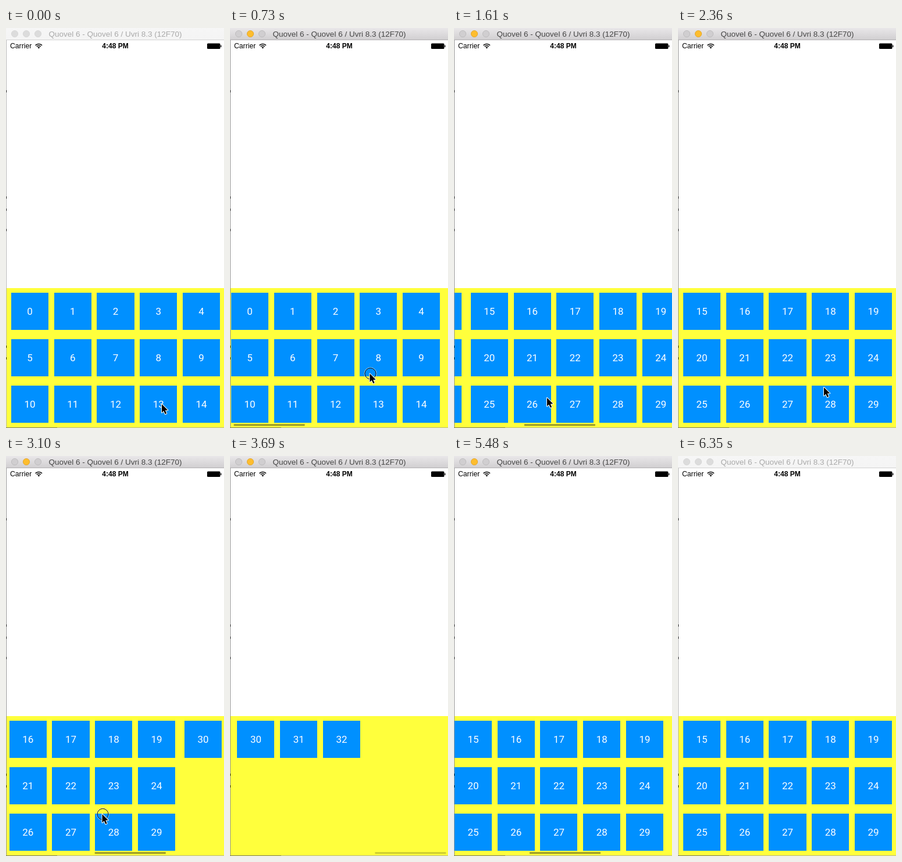
An HTML page with a canvas that plays this animation: 375x689 px, repeating every 6450 ms.

```html
<!DOCTYPE html>
<html lang="en">
<head>
<meta charset="utf-8">
<title>Paged grid</title>
<style>
html, body { margin: 0; width: 100%; height: 100%; overflow: hidden; background: #fff; }
canvas { display: block; }
</style>
</head>
<body>
<canvas id="stage" width="375" height="689"></canvas>
<script>
const W = 375, H = 689, LOOP = 6450;
const TICK = 147.7, LEAD = 15;   // the screen refreshes once per tick
const PAGE = 375, CELL = 64, PITCH = 73.75, ROW = 80, TOP = 448;
const CLICK = 4, BLUR = 43;      // ticks when the window gains and loses focus
const ctx = document.getElementById('stage').getContext('2d');
const SANS = '"Liberation Sans", Arial, sans-serif';

// Times in ticks: touch, lift, rest. Pages and dragged distance in px.
const SWIPES = [
  { touch: 4, lift: 7, rest: 16, from: 0, to: 1, drag: 62.5, tau: 1.45 },
  { touch: 19, lift: 21, rest: 26, from: 1, to: 2, drag: 77, tau: 0.9 },
  { touch: 32, lift: 33, rest: 39, from: 2, to: 1, drag: -36, tau: 1.07 }
];

// Pointer tip: tick, x, y
const PATHS = [
  [[0, 268, 648], [2, 264, 593], [4, 264, 594], [7, 193.5, 598], [11, 160, 637],
   [16, 251, 619], [19, 251, 619], [21, 165.5, 617], [23, 4, 677]],
  [[31, 129, 595], [32, 129, 595], [33, 186.5, 598], [35, 352, 612]]
];
const ARROW = new Path2D('M0 0V14.5L3.3 11.5 5.8 17 8.2 16 5.8 10.6 10.3 10.3Z');

const lerp = (a, b, u) => a + (b - a) * u;

// The drag speeds up with the finger, then the page glides to rest.
function scrollAt(k) {
  const s = SWIPES.findLast(s => s.touch <= k);
  if (!s) return 0;
  const from = s.from * PAGE, to = s.to * PAGE;
  if (k >= s.rest) return to;
  if (k <= s.lift) return from + s.drag * ((k - s.touch) / (s.lift - s.touch)) ** 2;
  return to - (to - from - s.drag) * Math.exp((s.lift - k) / s.tau);
}

function barAlpha(k) {
  const s = SWIPES.find(s => k > s.touch && k < s.rest);
  return s ? Math.min(1, (s.rest - k) / 2) : 0;
}

function pointerAt(k) {
  const p = PATHS.find(p => k >= p[0][0] && k <= p.at(-1)[0]);
  if (!p) return null;
  const i = Math.max(1, p.findIndex(key => key[0] >= k));
  const [t0, x0, y0] = p[i - 1], [t1, x1, y1] = p[i];
  const u = (k - t0) / (t1 - t0);
  return [lerp(x0, x1, u), lerp(y0, y1, u)];
}

function rect(x, y, w, h, color) {
  ctx.fillStyle = color;
  ctx.fillRect(x, y, w, h);
}

function pill(x, y, w, h, r, color) {
  ctx.beginPath();
  ctx.roundRect(x, y, w, h, r);
  ctx.fillStyle = color;
  ctx.fill();
}

function text(str, x, y, font, color, align = 'center') {
  ctx.font = font;
  ctx.textAlign = align;
  ctx.fillStyle = color;
  ctx.fillText(str, x, y);
}

function circle(x, y, r, fill, stroke, width = 1) {
  ctx.beginPath();
  ctx.arc(x, y, r, 0, Math.PI * 2);
  if (fill) { ctx.fillStyle = fill; ctx.fill(); }
  ctx.strokeStyle = stroke;
  ctx.lineWidth = width;
  ctx.stroke();
}

function drawTitleBar(active) {
  const g = ctx.createLinearGradient(0, 0, 0, 20);
  g.addColorStop(0, active ? '#e9e7e9' : '#f6f6f6');
  g.addColorStop(1, active ? '#d1cfd1' : '#f4f4f4');
  rect(0, 0, W, 20, g);
  rect(0, 20, W, 1, active ? '#b2b0b2' : '#d2d2d2');
  const idle = active ? ['#d0ced0', '#b8b6b8'] : ['#dcdcdc', '#d3d3d3'];
  for (let i = 0; i < 3; i++) {
    const colors = active && i === 1 ? ['#fdbd2e', '#dfa023'] : idle;
    circle(15 + 20 * i, 10, 5.6, ...colors, 0.8);
  }
  text('Quovel 6 - Quovel 6 / Uvri 8.3 (12F70)', 188, 15, '13.5px ' + SANS,
    active ? '#454545' : '#a9a9a9');
}

function drawWifi(x, y) {
  ctx.strokeStyle = '#000';
  for (const r of [1.4, 5, 8]) {
    ctx.lineWidth = r < 2 ? 2.8 : 1.6;
    ctx.beginPath();
    ctx.arc(x, y, r, -Math.PI * 0.75, -Math.PI * 0.25);
    ctx.stroke();
  }
}

function drawStatus() {
  text('Carrier', 7, 35, '12.2px ' + SANS, '#000', 'left');
  drawWifi(56.3, 35.5);
  text('4:48 PM', 188, 35, 'bold 12px ' + SANS, '#000');
  pill(346, 26.5, 22.5, 9.5, 1.5, '#000');
  rect(369, 29.5, 1.5, 3.5, '#222');
}

function drawGrid(scroll) {
  ctx.save();
  ctx.beginPath();
  ctx.rect(1, TOP, W - 1, 240);
  ctx.clip();
  rect(0, TOP, W, 240, '#ffff3c');
  for (let n = 0; n < 33; n++) {
    const page = Math.floor(n / 15), row = Math.floor(n % 15 / 5);
    const x = 9 + page * PAGE + n % 5 * PITCH - scroll;
    const y = TOP + 8 + row * ROW;
    const left = Math.ceil(x - 0.5), right = Math.floor(x + CELL + 0.5);
    rect(left, y, right - left, CELL, '#0090ff');
    text(n, x + CELL / 2, y + 38, '17px Roboto, sans-serif', '#fff');
  }
  ctx.restore();
}

function drawBar(scroll, alpha) {
  pill(4 + scroll * 0.3285, 682.5, 122.5, 2.5, 1.25, `rgba(0,0,0,${0.45 * alpha})`);
}

function drawEdges(active) {
  rect(0, 21, 1, H - 21, active ? '#989898' : '#b8b8b8');
  for (const y of [107, 290, 311, 346, 547, 567]) rect(0, y, 1, 4, '#222');
  rect(0, 688, W, 1, '#b5b5a0');
  rect(0, 688, 88, 1, '#77776a');
}

function drawPointer([x, y], pressed) {
  if (pressed) {
    circle(x + 1, y, 10.5, null, 'rgba(255,255,255,.7)');
    circle(x + 1, y, 9.6, null, '#000');
  }
  ctx.save();
  ctx.translate(x, y);
  ctx.lineJoin = 'round';
  ctx.strokeStyle = '#fff';
  ctx.lineWidth = 2;
  ctx.stroke(ARROW);
  ctx.fillStyle = '#000';
  ctx.fill(ARROW);
  ctx.restore();
}

function draw(time) {
  const k = Math.min(BLUR, Math.floor((time % LOOP + LEAD) / TICK));
  const active = k >= CLICK && k < BLUR;
  const scroll = scrollAt(k), pointer = pointerAt(k);
  rect(0, 0, W, H, '#fff');
  drawTitleBar(active);
  drawStatus();
  drawGrid(scroll);
  drawBar(scroll, barAlpha(k));
  drawEdges(active);
  if (pointer) drawPointer(pointer, SWIPES.some(s => k >= s.touch && k <= s.lift));
}

const began = performance.now();
function tick() {
  draw(performance.now() - began);
  requestAnimationFrame(tick);
}
tick();
</script>
</body>
</html>
```
